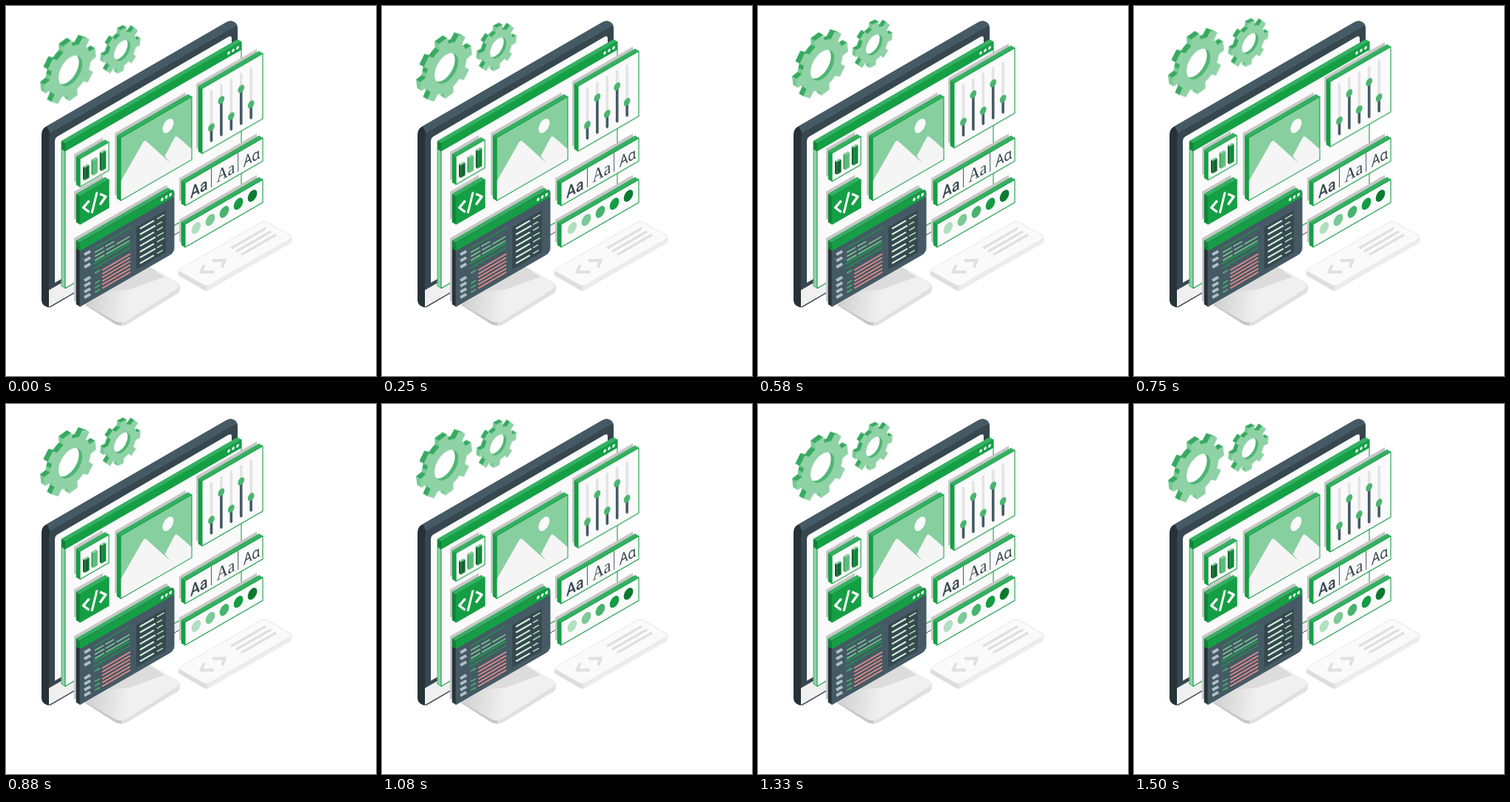
An HTML page for the animation above (1.54 s loop, 500 px wide and 500 px high).

```html
<!DOCTYPE html>
<html lang="en">
<head>
<meta charset="utf-8">
<title>Isometric web design</title>
<style>
  html, body { margin: 0; width: 100%; height: 100%; overflow: hidden; background: #fff; }
  svg { display: block; width: 100vw; height: 100vh; }
  .float { animation: float 1540ms linear -40ms infinite; }
  @keyframes float {
    50% { transform: translateY(-10px); }
  }
</style>
</head>
<body>
<svg id="stage" viewBox="0 0 500 500"></svg>
<script>
const K = 0.577;
const GREEN = '#159f45', LEAF = '#34b061', DEEP = '#0d8537', MINT = '#87cf9f';
const PAPER = '#fafafa', STEEL = '#455a64', SLATE = '#37474f', INK = '#263238', SHADE = '#c7c7c7';

const path = (d, fill, extra = '') => `<path d="${d}" fill="${fill}" ${extra}/>`;
const stroke = (d, color, w, cap = 'butt') =>
  `<path d="${d}" fill="none" stroke="${color}" stroke-width="${w}" stroke-linecap="${cap}" stroke-linejoin="round"/>`;
// Isometric rectangle; r rounds the two right corners.
const quad = (x, y, w, h, r = 0) =>
  `M${x} ${y}l${w - r} ${(r - w) * K}q${r} ${-r * K} ${r} ${r * (1 - K)}v${h - 2 * r}` +
  `q0 ${r} ${-r} ${r * (1 + K)}l${r - w} ${(w - r) * K}z`;
const seg = (x, y, w, color, t = 1.5) => stroke(`M${x} ${y}l${w} ${-w * K}`, color, t);
const disc = (x, y, r, fill) =>
  `<circle r="${r}" fill="${fill}" transform="matrix(.866 -.5 0 1 ${x} ${y})"/>`;
const clip = (id, shape, s) => `<clipPath id="${id}">${shape}</clipPath><g clip-path="url(#${id})">${s}</g>`;
const float = (s) => `<g class="float">${s}</g>`;

// Isometric slab; x, y is the top left corner of its front face.
function slab(x, y, w, h, { front = PAPER, side = GREEN, top = LEAF, edge = GREEN, shadow = true, r = 0 } = {}) {
  const hem = (c) => `stroke="${c}" stroke-width=".6" stroke-linejoin="round"`;
  return (shadow ? path(quad(x - 8, y - 6.2, w, h, r), SHADE) : '') +
    path(quad(x - 5, y - 3, w, h, r), top) +
    path(`M${x} ${y}l-5 -3v${h}l5 3z`, side, hem(side)) +
    path(`M${x} ${y}l-5 -3l${w - r} ${(r - w) * K}l5 3z`, top, hem(top)) +
    path(quad(x, y, w, h, r), front, `stroke="${edge}" stroke-width="1.1" stroke-linejoin="round"`);
}

function gear(cx, cy, r, root, hole, turn, dx, dy, id) {
  const pts = [];
  const put = (rad, deg) => {
    const a = deg * Math.PI / 180, u = rad * Math.cos(a), v = rad * Math.sin(a);
    pts.push([cx + 0.866 * u, cy - 0.5 * u + v]);
  };
  for (let i = 0; i < 8; i++) {
    const a = turn + i * 45;
    put(root, a - 12.5); put(r, a - 9); put(r, a + 9); put(root, a + 12.5);
    put(root, a + 22.5);
  }
  const outline = (ox, oy) => 'M' + pts.map(([x, y]) => `${(x + ox).toFixed(1)} ${(y + oy).toFixed(1)}`).join('L') + 'z';
  let out = path(outline(dx, dy), '#6cc38a');
  pts.forEach(([x, y], i) => {
    const [p, q] = pts[(i + 1) % pts.length];
    const nx = q - y, ny = x - p;
    if (nx * dx + ny * dy <= 0) return;
    const fill = ny < -Math.abs(nx) * 0.25 ? '#38aa61' : '#78ca94';
    out += path(`M${x} ${y}L${p} ${q}l${dx} ${dy}L${x + dx} ${y + dy}z`, fill, `stroke="${fill}" stroke-width=".4"`);
  });
  return out +
    path(outline(0, 0), '#8fd2a5', 'stroke="#a3dab5" stroke-width=".5" stroke-linejoin="round"') +
    disc(cx, cy, hole, '#4fb674') +
    clip(id, disc(cx, cy, hole, '#000'), disc(cx + dx * 0.75, cy + dy * 0.75, hole, '#fff'));
}

function stand() {
  return `<linearGradient id="foot" gradientUnits="userSpaceOnUse" x1="107" y1="400" x2="165" y2="408">
      <stop offset="0" stop-color="#cfcfcf"/><stop offset="1" stop-color="#f0f0f0"/></linearGradient>` +
    path('M107 404L146 429Q155 435 164 430L231 389Q235 387 235 383V377L190 356z', '#e0e0e0') +
    path('M107 404L146 429Q151 432 156 432V426L112 401z', SHADE) +
    path('M107 403L190 355Q195 352 200 355L231 373Q238 377 231 382L164 425Q155 430 146 425z', 'url(#foot)') +
    path('M138 386L160 384Q166 384 170 382L214 366L190 350z', '#dcdcdc');
}

function monitor() {
  return path('M48 174Q48 166 54 163L296 23Q303 18 309 22Q313 25 313 32V260L62 406Q58 409 52 405Q48 402 48 397z', INK) +
    path('M55 162.500L296 23Q303 18 309 22Q312 24 313 28Q310 27 306 30L64 169.500Q61 171 60 173z', STEEL) +
    path('M58 180Q58 173 64 169.5L306 30Q313 26 313 32V258L58 406z', SLATE) +
    path('M66 183Q66 178 70 176L300 42Q305 39 305 44V236L66 374z', PAPER) +
    path(quad(58, 384, 255, 23), '#f0f0f0') +
    seg(58, 407, 255, SLATE, 0.6);
}

function dots3(xs, x0, y0) {
  return xs.map(x => disc(x, y0 - (x - x0) * K, 2.1, '#fff')).join('');
}

function browser() {
  return slab(80, 185.5, 238, 196, { side: '#8fd2a5', shadow: false }) +
    stroke('M80 381.5l-5 -3V183', LEAF, 0.8) +
    path('M80 185.5l-5 -3v11l5 3z', DEEP) +
    path(quad(80, 185.5, 238, 11), GREEN) +
    dots3([301, 307, 313], 80, 191);
}

function picture() {
  return slab(155, 178, 96, 85, { front: MINT }) +
    disc(219, 162, 8.7, PAPER) +
    path('M155.6 236L185 184.500Q187.500 180.500 190.500 183.500L222 212L214.500 203L227.500 178.500Q229 175 232 177L250.400 193V207.300L155.600 262z', '#f5f5f5');
}

function codeTile() {
  return slab(100, 257, 39, 38, { front: GREEN, side: DEEP }) +
    stroke('M112.500 263L104.500 272.500L112.500 278.500M127 254L134.800 257.500L127 268.500', '#fff', 3.4) +
    stroke('M116 280L123 251.500', '#fff', 3);
}

function chart() {
  const bar = (x, y, h, fill, side) =>
    path(`M${x + 2.5} ${y}l-2.5 -1.500v${h}l2.500 1.500z`, side) +
    path(`M${x + 2.5} ${y}l-2.5 -1.500l6 -3.500l2.500 1.500z`, MINT) +
    path(quad(x + 2.5, y, 6, h), fill);
  return slab(100, 207, 39, 38) +
    bar(104, 219, 17, '#0d6b2d', '#0a4f21') +
    bar(115.3, 209.5, 20, '#5dbd7d', '#35a45a') +
    bar(126.7, 199.5, 24, '#128a3c', '#0a5c27');
}

function sliders() {
  const knobs = [164.5, 127.5, 149.5, 112.5, 133.5];
  return slab(265, 112, 82, 88) + knobs.map((y, i) => {
    const x = 277.5 + i * 13.4, top = 115.5 - i * 7.7;
    return stroke(`M${x} ${top}V${y}`, '#e3e3e3', 3.6, 'round') +
      stroke(`M${x} ${y}V${top + 67}`, STEEL, 3.6, 'round') +
      disc(x, y, 5, '#4ab56f');
  }).join('');
}

function fonts() {
  const word = (x, y, s, size, font, weight) =>
    `<text transform="matrix(.866 -.5 0 1 ${x} ${y})" font-family="${font}" font-size="${size}" font-weight="${weight}" fill="${SLATE}">${s}</text>`;
  return slab(242, 239, 105, 31) +
    word(249, 260.5, 'Aa', 22.5, 'Roboto, sans-serif', 500) +
    word(284.5, 239, 'Aa', 24.5, 'Liberation Serif, serif', 400) +
    word(321, 218, 'Aɑ', 20.5, 'Noto Sans, sans-serif', 400) +
    stroke('M277.500 219.500v25.500M313.700 198.500v25.500', STEEL, 1);
}

function swatches() {
  const tones = ['#b3dfc1', '#7bca95', '#47b36c', '#139c43', '#0b7a31'];
  return slab(242, 295, 105, 31) +
    tones.map((c, i) => disc(257 + i * 19, 300 - i * 10.9, 7.3, c)).join('');
}

function editor() {
  let s = path('M100 320l-5 -3v11l5 3z', DEEP) +
    clip('screen', path(quad(100, 320, 127, 86, 6), '#000'), path(quad(99, 320, 129, 11.5), GREEN)) +
    dots3([211, 216.7, 222.3], 100, 325.5) +
    path(quad(176, 299, 40, 57), SLATE);
  for (const y of [336, 344.5, 353, 371, 378.5, 386.5, 394]) s += seg(106, y, 8, '#b0bec5', 4);
  const code = [
    [120, 333, 12], [134, 325, 12],
    [120, 338.5, 13], [135, 330, 12], [149, 322, 18],
    [120, 344, 13], [135, 335.5, 32]
  ];
  for (const [x, y, w] of code) s += seg(x, y, w, '#7bca95');
  s += seg(118, 328, 50, GREEN, 1.2) + seg(118, 349, 50, GREEN, 1.8) + seg(118, 355, 50, GREEN, 1.2);
  for (let i = 0; i < 6; i++) s += seg(130, 357 + i * 4.9, 38, '#e88b8b', 1.7);
  for (const y of [361, 375, 381, 387]) s += seg(120, y, 7, '#47b36c', 1.7);
  for (let i = 0; i < 7; i++) {
    const y = 301 + i * 7.8;
    s += seg(181, y, 19 + (i * 2) % 4, '#cdeed8', 2.2) +
      seg(204, y - 23 * K, 10 - (i * 3) % 4, '#a5d8b6', 1.7);
  }
  return slab(100, 320, 127, 86, { front: STEEL, side: INK, edge: STEEL, r: 6 }) + s;
}

function plate() {
  let s = path('M233 357V362Q233 364 235 365L268 384Q271 386 274 384L384 321Q386 320 386 318V312z', '#ececec') +
    path('M233 357V362Q233 364 235 365L268 384Q270 385.500 271.500 385V378z', '#dedede') +
    path('M235 355.500L345 292Q349 290 353 292L384 310Q388 312.500 384 315L275 377Q271 379 267 377L235 359Q231 357.500 235 355.500z', PAPER,
      'stroke="#e0e0e0" stroke-width=".8"') +
    stroke('M268 350L263.500 359.500L281 359.500M279 344L296 343.500L292 353', '#e0e0e0', 4);
  for (let i = 0; i < 3; i++) s += seg(304 + i * 7, 327.5 + i * 4.3, 47, '#e0e0e0', 3.4);
  return s;
}

document.getElementById('stage').innerHTML =
  plate() + stand() + monitor() + browser() +
  float(gear(87, 88, 40, 31.5, 18.5, -7, -6, -3.5, 'hub1') +
    gear(157, 60.5, 28.5, 22, 12.8, 5, -4.8, -2.8, 'hub2')) +
  picture() + float(chart()) + codeTile() +
  float(sliders()) + fonts() + swatches() + editor();
</script>
</body>
</html>
```
